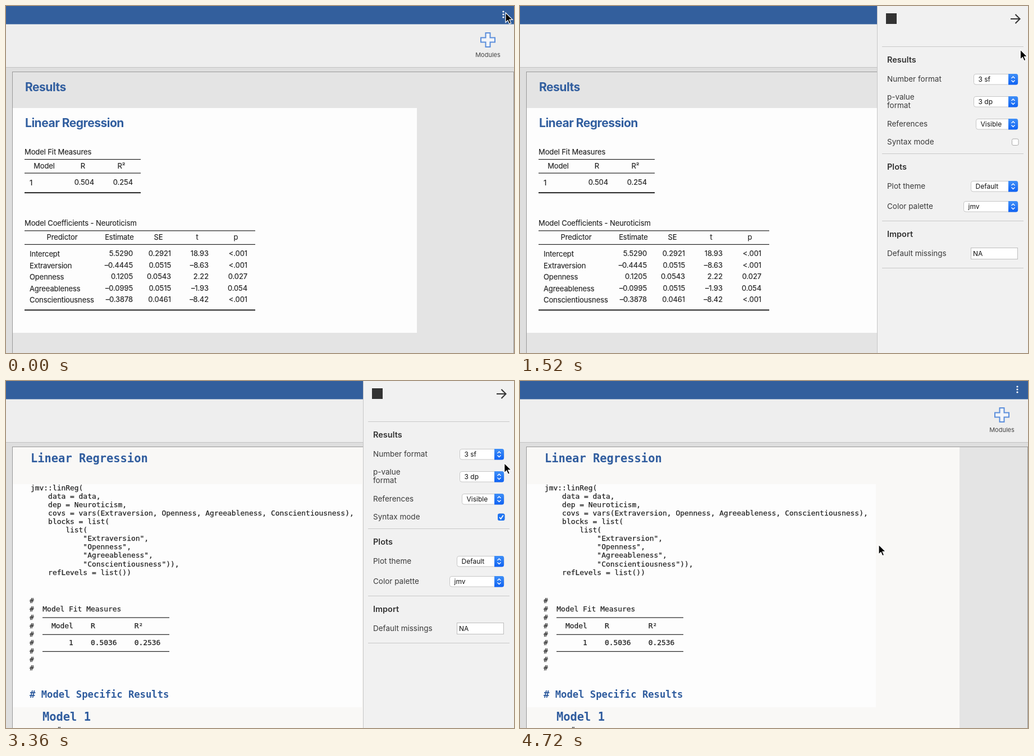
Animation of 905x619 px, one loop 4.8 s. Source, as an HTML page:

```html
<!DOCTYPE html>
<html lang="en">
<head>
<meta charset="utf-8">
<style>
  html, body { margin: 0; width: 100%; height: 100%; overflow: hidden; background: #dedede; }
  svg { display: block; width: 905px; height: 619px; font: 13px Inter, sans-serif; fill: #222; }
  text { white-space: pre; }
  .title { font-size: 21px; font-weight: 700; letter-spacing: -.48px; fill: #315e9f; }
  .cell { letter-spacing: -.1px; stroke: #222; stroke-width: .15px; }
  .code { font: 12.93px "DejaVu Sans Mono", monospace; stroke: #222; stroke-width: .25px; }
  .codeTitle { font: 700 20.4px "DejaVu Sans Mono", monospace; fill: #2f5c9e; }
  .codeSub { font: 700 17.2px "DejaVu Sans Mono", monospace; fill: #2f5c9e; }
  .small { font-size: 11px; fill: #444; }
  .label { font-size: 13.5px; fill: #3a3a3a; }
  .heading { font-size: 14.5px; font-weight: 600; fill: #333; }
  .value { font-size: 12px; fill: #111; }
</style>
</head>
<body>
<svg id="stage" viewBox="0 0 905 619"></svg>
<script>
const rect = (x, y, w, h, fill, extra = '') =>
  `<rect x="${x}" y="${y}" width="${w}" height="${h}" fill="${fill}" ${extra}/>`;
const text = (x, y, str, cls, anchor = 'start') =>
  `<text x="${x}" y="${y}" class="${cls}" text-anchor="${anchor}">${str.replace(/</g, '&lt;')}</text>`;
const path = (d, stroke, width, fill = 'none') =>
  `<path d="${d}" stroke="${stroke}" stroke-width="${width}" fill="${fill}"/>`;

function frame() {
  return rect(0, 32, 905, 77, '#eee') + rect(0, 0, 905, 32.5, '#335f9d') +
    rect(0, 109, 905, 1, '#c2c2c2') + rect(11.5, 117.5, 893, 520, '#e4e4e4', 'stroke="#999"') +
    path('M854.5 48h8v8.5h8.5v8h-8.5v8.5h-8v-8.5h-8.5v-8h8.5z', '#5b8edb', 2, '#f3f5f9') +
    text(858.5, 90.5, 'Modules', 'small', 'middle') +
    rect(873, 3, 25, 25, '#426ca8', 'id="menuHover"') +
    [10, 15, 20].map(y => `<circle cx="886" cy="${y}" r="1.6" fill="#fff"/>`).join('');
}

// Column: [header, header centre, right edge of values, ...values]
function table(y, width, caption, columns) {
  const rows = columns[0].length - 3;
  const end = y + 60 + (rows - 1) * 20.5;
  const rule = (ry, h) => rect(33, ry, width, h, '#222');
  return text(33, y - 8, caption, 'cell') + rule(y, 1.2) + rule(y + 24.5, 1.2) + rule(end - .9, 2) +
    columns.map(([head, centre, right, ...values], c) =>
      text(centre, y + 17, head, 'cell', 'middle') +
      values.map((v, r) => c
        ? text(right, y + 46 + r * 20.5, v, 'cell', 'end')
        : text(42, y + 46.7 + r * 20.5, v, 'cell')).join('')).join('');
}

function plainResults() {
  return rect(12, 182, 720, 401, '#fdfdfd') +
    text(34, 152, 'Results', 'title') + text(34, 216, 'Linear Regression', 'title') +
    table(273, 207, 'Model Fit Measures', [
      ['Model', 68, 0, '1'], ['R', 137, 157, '0.504'], ['R²', 205.5, 226, '0.254']]) +
    table(400.3, 411, 'Model Coefficients - Neuroticism', [
      ['Predictor', 100, 0, 'Intercept', 'Extraversion', 'Openness', 'Agreeableness', 'Conscientiousness'],
      ['Estimate', 202, 226, '5.5290', '–0.4445', '0.1205', '–0.0995', '–0.3878'],
      ['SE', 271.5, 294, '0.2921', '0.0515', '0.0543', '0.0515', '0.0461'],
      ['t', 340.5, 361, '18.93', '–8.63', '2.22', '–1.93', '–8.42'],
      ['p', 409.5, 430, '<.001', '<.001', '0.027', '0.054', '<.001']]);
}

function syntaxResults() {
  const lines = (x, y, str) => str.split('\n').map((s, i) => text(x, y + i * 15.1, s, 'code')).join('');
  const call = `jmv::linReg(
    data = data,
    dep = Neuroticism,
    covs = vars(Extraversion, Openness, Agreeableness, Conscientiousness),
    blocks = list(
        list(
            "Extraversion",
            "Openness",
            "Agreeableness",
            "Conscientiousness")),
    refLevels = list())`;
  const fit = `#
#  Model Fit Measures
#
#    Model    R         R²
#
#        1    0.5036    0.2536
#
#
#`;
  return rect(12, 118, 771, 501, '#f9f8f6') + rect(12, 184, 622, 398, '#fdfdfd') +
    text(44, 144.7, 'Linear Regression', 'codeTitle') + lines(44, 194.6, call) + lines(42, 395.5, fit) +
    [0, 1, 2].map(i => rect(65, 421.5 + i * 30.2, 226, 1.2, '#222')).join('') +
    text(42, 565, '# Model Specific Results', 'codeSub') +
    text(65, 606, 'Model 1', 'codeTitle') + text(90, 626, '#', 'code');
}

function settingsPanel() {
  const select = (x, y, value) =>
    rect(x + .5, y + .5, 886.5 - x, 18.5, '#fff', 'rx="3.5" stroke="#c6c6c6"') +
    `<path d="M870 ${y}h13.5q3.5 0 3.5 3.5v12.5q0 3.5 -3.5 3.5h-13.5z" fill="url(#blue)"/>` +
    path(`M875.5 ${y + 8}l3-3 3 3M875.5 ${y + 11.5}l3 3 3-3`, '#fff', 1.4) +
    text(x + 8.5, y + 14, value, 'value');
  const labels = [[135, 'Number format'], [167, 'p-value'], [182, 'format'], [215, 'References'],
    [247, 'Syntax mode'], [326, 'Plot theme'], [362, 'Color palette'], [446, 'Default missings']];
  const headings = [[101, 'Results'], [292, 'Plots'], [412, 'Import']];
  return rect(636, 0, 269, 619, '#f1f1f1') + rect(636, 0, 1, 619, '#c6c6c6') +
    rect(637, 229, 268, 28, '#d4d4d4', 'id="rowHover"') +
    rect(652, 13, 19, 19, '#333') +
    path('M874 23H890M882.5 15L890.5 23L882.5 31', '#333', 2.1) +
    [72, 263, 383, 467].map(y => rect(645, y, 252, 1, '#c8c8c8')).join('') +
    labels.map(([y, s]) => text(654, y, s, 'label')).join('') +
    headings.map(([y, s]) => text(654, y, s, 'heading')).join('') +
    select(808, 121, '3 sf') + select(808, 161, '3 dp') + select(812, 201, 'Visible') +
    select(803, 312, 'Default') + select(790, 348, 'jmv') +
    rect(876.5, 237, 11.5, 11.5, '#fff', 'rx="2.5" stroke="#aaa"') +
    `<g id="checked">${rect(876, 236.5, 12.5, 12.5, '#1f74f2', 'rx="3"')}${path('M879 243l2.5 3 4.3-6.5', '#fff', 1.7)}</g>` +
    rect(803.5, 431.5, 83, 20, '#fff', 'stroke="#bdbdbd"') + text(807, 446, 'NA', 'value');
}

document.getElementById('stage').innerHTML = `
  <linearGradient id="blue" x2="0" y2="1"><stop stop-color="#3f8ff7"/><stop offset="1" stop-color="#0f62f3"/></linearGradient>
  ${frame()}
  <g id="plain">${plainResults()}</g><g id="syntax">${syntaxResults()}</g>
  <g id="panel">${settingsPanel()}</g>
  <g id="cursor">
    <g id="ring" fill="none"><circle cx="-1" cy="4" r="19.5" stroke="#fff" stroke-width="5"/>
      <circle cx="-1" cy="4" r="20" stroke="#111" stroke-width="3"/></g>
    <path d="M0 0V16L3.7 12.5L6.2 18.3L8.9 17.2L6.4 11.5H11.5Z" transform="scale(1.08)"
      fill="#000" stroke="#fff" stroke-width="1.1"/>
  </g>`;

const el = id => document.getElementById(id);
const show = (id, on) => el(id).style.display = on ? '' : 'none';
const ease = (t, start, end) => {
  const p = Math.min(1, Math.max(0, (t - start) / (end - start)));
  return p * p * (3 - 2 * p);
};

const LOOP = 4800, STEP = 80;
const clicks = [800, 2480, 3600];
// Cursor moves: [start, end, x, y, sideways bulge]
const moves = [[1280, 1950, 881, 237, 5], [3200, 3560, 888, 20, 4], [4080, 4640, 639, 292, 0]];

function cursorAt(t) {
  let x = 890, y = 12;
  for (const [start, end, toX, toY, bulge] of moves) {
    const p = ease(t, start, end);
    x += (toX - x) * p + bulge * Math.sin(Math.PI * p);
    y += (toY - y) * p;
  }
  return [x, y];
}

function draw(now) {
  const t = Math.floor(now % LOOP / STEP) * STEP;
  const [x, y] = cursorAt(t);
  const open = ease(t, 880, 1200) - ease(t, 3640, 3920);
  const syntax = t >= 2640;
  el('panel').setAttribute('transform', `translate(${270 * (1 - open)} 0)`);
  el('cursor').setAttribute('transform', `translate(${x} ${y})`);
  show('plain', !syntax);
  show('syntax', syntax);
  show('checked', t >= 2560);
  show('rowHover', y > 229 && y < 257);
  show('menuHover', t > 0 && x > 873 && y < 28);
  show('ring', clicks.some(c => t >= c && t < c + 160));
  requestAnimationFrame(draw);
}
requestAnimationFrame(draw);
</script>
</body>
</html>
```
